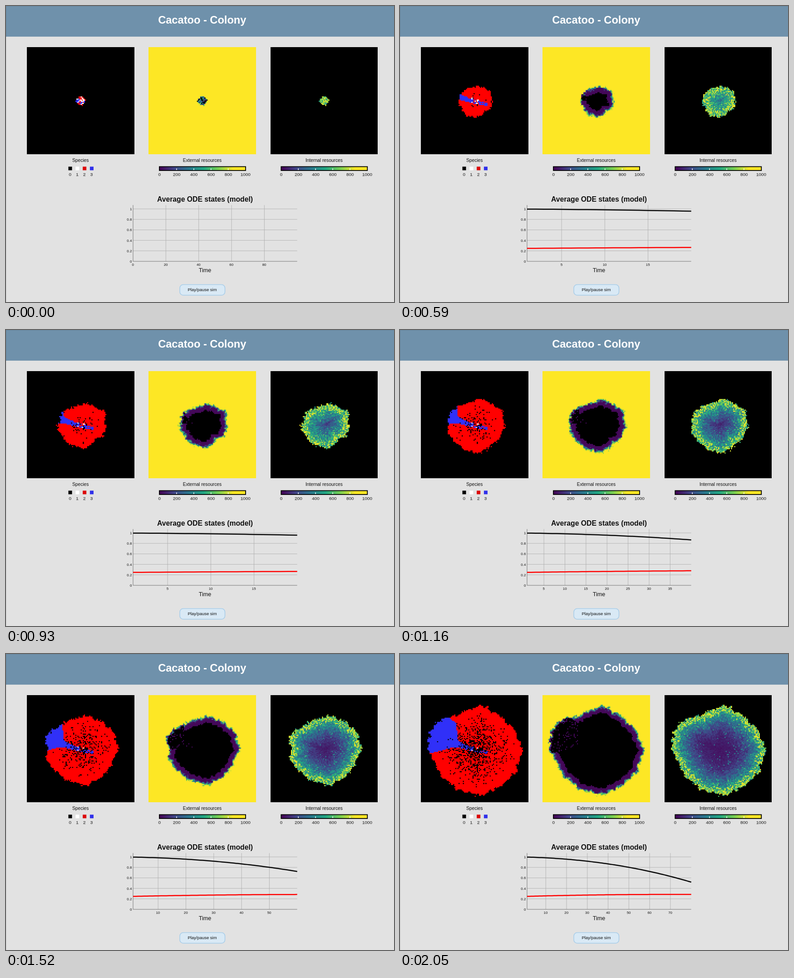
These frames come from a looping animation (855x655 px, 2.15 s). An HTML page with a canvas:

```html
<!DOCTYPE html>
<html lang="en">
<head>
<meta charset="utf-8">
<title>Cacatoo - Colony</title>
<style>
  html, body { margin: 0; width: 100%; height: 100%; overflow: hidden; background: #e2e2e2; }
  svg, canvas { position: absolute; display: block; }
  svg { left: 0; top: 0; font-family: "Liberation Sans", Arial, sans-serif; }
  canvas { top: 91.4px; width: 236.5px; height: 236.5px; }
</style>
</head>
<body>
<svg id="page" width="855" height="655" viewBox="0 0 855 655">
  <defs>
    <linearGradient id="viridis"></linearGradient>
  </defs>
  <rect width="855" height="655" fill="#e2e2e2"/>
  <path d="M.5 68V655" stroke="#cdcdcd"/>
  <rect width="855" height="67.8" fill="#6f91ab"/>
  <path d="M.5 68V.5H855" fill="none" stroke="#66859d"/>
  <g id="labels"></g>
  <g id="chart"></g>
  <rect x="383" y="616.5" width="99.5" height="23.5" rx="7.5" fill="#d9e9f5" stroke="#a9cee9" stroke-width="1.6"/>
  <text x="432.5" y="631" font-size="9.46" text-anchor="middle" fill="#111">Play/pause sim</text>
</svg>
<script>
const LOOP = 2150, SIZE = 100, CELL = 2.365, TAU = Math.PI * 2;
const PANEL_X = [46, 314.3, 582.7];
const STOPS = [[68, 1, 84], [65, 68, 135], [42, 120, 142], [34, 168, 132], [122, 209, 81], [253, 231, 37]];
const BLACK = [0, 0, 0], WHITE = [255, 255, 255], RED = [255, 0, 0], BLUE = [48, 48, 248];

const clamp = (v, lo = 0, hi = 1) => Math.min(hi, Math.max(lo, v));
const mix = (a, b, f) => a + (b - a) * f;

// Linear interpolation through [position, value] keys.
function track(keys, p) {
  let i = 1;
  while (i < keys.length - 1 && keys[i][0] < p) i++;
  const [p0, v0] = keys[i - 1], [p1, v1] = keys[i];
  return mix(v0, v1, (p - p0) / (p1 - p0));
}

function hash(x, y, seed) {
  const s = Math.sin(x * 127.1 + y * 311.7 + seed * 74.7) * 43758.5453;
  return s - Math.floor(s);
}

function viridis(v) {
  const p = clamp(v) * 5, i = Math.min(4, Math.floor(p));
  return STOPS[i].map((c, n) => Math.round(mix(c, STOPS[i + 1][n], p - i)));
}

// ---- Clock: simulation steps
const stepKeys = [[0, 0], [1, 20], [44, 1080], [45, 1100], [65, 1620], [66, 1650], [81, 2050]];
const stepTimes = Array.from({ length: 82 }, (_, k) => Math.round(track(stepKeys, k) / 10) * 10);

// ---- Colony outline: radii every 15 degrees, clockwise from the right
const outlines = [
  [0, Array(24).fill(10)],
  [930, [55, 55, 54, 44, 48, 52, 51, 48, 49, 48, 47, 50, 51, 46, 50, 45, 44, 41, 43, 49, 49, 50, 60, 54]],
  [1520, [83, 78, 76, 78, 77, 81, 77, 75, 74, 73, 76, 78, 72, 81, 77, 68, 68, 66, 70, 74, 73, 76, 81, 80]],
  [2050, [105, 102, 102, 101, 98, 103, 99, 98, 94, 93, 94, 92, 103, 102, 105, 92, 84, 85, 92, 95, 90, 91, 95, 98]]
];

function outlineAt(t) {
  return outlines[0][1].map((_, i) => track(outlines.map(([time, radii]) => [time, radii[i]]), t));
}

function radiusAt(outline, angle) {
  const p = angle / TAU * 24, i = Math.floor(p) % 24;
  const base = mix(outline[i], outline[(i + 1) % 24], p % 1);
  return base * (1 + .016 * Math.sin(13 * angle + 1) + .016 * Math.sin(29 * angle));
}

// Territory of species 3, in page coordinates
const territory = [[40, 226], [72, 219], [112, 208], [128, 207], [150, 213], [163, 216], [192, 222], [192, 215],
  [170, 209], [150, 202], [135, 197], [127, 190], [124, 155], [105, 137], [40, 130]];

function inside(x, y, poly) {
  let hit = false;
  poly.forEach(([x1, y1], i) => {
    const [x2, y2] = poly[(i + 1) % poly.length];
    if ((y1 > y) !== (y2 > y) && x < x1 + (y - y1) / (y2 - y1) * (x2 - x1)) hit = !hit;
  });
  return hit;
}

const cells = Array.from({ length: SIZE * SIZE }, (_, i) => {
  const col = i % SIZE, row = Math.floor(i / SIZE);
  const x = PANEL_X[0] + (col + .5) * CELL, y = 91.5 + (row + .5) * CELL;
  const dx = x - 164.3, dy = y - 210;
  const h = [1, 2, 3, 4].map(seed => hash(col, row, seed));
  return {
    dist: Math.hypot(dx, dy),
    angle: (Math.atan2(dy, dx) + TAU) % TAU,
    rough: 4.5 * (hash(col >> 1, row >> 1, 5) - .5) + 2.6 * (h[0] - .5),
    blue: inside(x, y, territory) && (x < 150 || h[3] > .2),
    h
  };
});

function species(c, depth, radius, t) {
  if (depth < 0) return BLACK;
  if (c.dist < 10 && c.h[2] < .04 + .36 * Math.exp(-t / 500)) return WHITE;
  let death = .00037 * Math.max(0, t - 400) * Math.pow(clamp(1 - c.dist / (.9 * radius)), 1.25);
  if (c.blue && c.dist > 35) death *= .15;
  if (c.h[1] < death) return BLACK;
  return c.blue ? BLUE : RED;
}

function external(c, depth, radius) {
  if (radius < 13 && depth > 0) return c.h[1] < .3 ? BLACK : viridis(c.h[2] * .75);
  if (c.blue && c.dist > 18) {
    if (depth > 2.5) return c.h[2] < .1 && depth < 62 ? viridis(.02) : BLACK;
    return viridis(.3 - depth * .3);
  }
  if (depth > 14.5 + c.rough * .6) return BLACK;
  const rise = clamp((6 - depth) / 7.5);
  return viridis(.02 + rise * rise * (3 - 2 * rise));
}

function internal(c, depth, radius) {
  if (depth < 0) return BLACK;
  const reach = 33 + .8 * Math.max(0, 60 - radius);
  const mean = .055 + .66 * Math.exp(-Math.pow(depth / reach, 1.4));
  if (depth < 14 && c.h[3] < .25) return viridis(.88 + .12 * c.h[2]);
  if (c.h[3] > .965) return viridis(mean + .3);
  return viridis(mean * (.65 + .7 * c.h[2]));
}

// ---- Grid panels
const small = document.createElement("canvas");
small.width = small.height = SIZE;
const smallCtx = small.getContext("2d");
const image = smallCtx.createImageData(SIZE, SIZE);

const panels = [species, external, internal].map((paint, i) => {
  const canvas = document.createElement("canvas");
  canvas.width = canvas.height = SIZE * 3;
  canvas.style.left = PANEL_X[i] + "px";
  document.body.append(canvas);
  const ctx = canvas.getContext("2d");
  ctx.imageSmoothingEnabled = false;
  return { paint, ctx };
});

function drawPanels(t) {
  const outline = outlineAt(t);
  const state = cells.map(c => {
    const radius = radiusAt(outline, c.angle);
    return [radius + c.rough - c.dist, radius];
  });
  for (const { paint, ctx } of panels) {
    cells.forEach((c, i) => image.data.set([...paint(c, ...state[i], t), 255], i * 4));
    smallCtx.putImageData(image, 0, 0);
    ctx.drawImage(small, 0, 0, SIZE * 3, SIZE * 3);
  }
}

// ---- Text and legends
const LEGEND_TEXT = 'style="fill:#444;stroke:#444;stroke-width:.25"';
const text = (x, y, size, content, extra = "") =>
  `<text x="${x}" y="${y}" font-size="${size}" text-anchor="middle" fill="#111" ${extra}>${content}</text>`;

function colourBar(x) {
  let out = `<rect x="${x}" y="355.5" width="190" height="8.5" fill="url(#viridis)" stroke="#000" stroke-width="1.8"/>`;
  for (let i = 0; i <= 5; i++) {
    const tx = x + i * 37.9;
    if (i > 0 && i < 5) out += `<path d="M${tx} 359.5v3.5" stroke="#fff" stroke-width="1.5"/>`;
    out += text(tx + .3, 375.5, 9.9, i * 200, LEGEND_TEXT);
  }
  return out;
}

function drawLabels() {
  // The legend reaches its brightest colour before the end of the bar.
  document.getElementById("viridis").innerHTML = STOPS.map((c, i) =>
    `<stop offset="${i * .172}" stop-color="rgb(${c})"/>`).join("");
  const swatches = ["#000", "#fff", "#dc0808", "#3030ea"].map((fill, i) =>
    `<rect x="${137.5 + i * 15.8}" y="355.5" width="8" height="8" fill="${fill}"/>` +
    text(141.2 + i * 15.8, 375.5, 9.9, i, LEGEND_TEXT));
  document.getElementById("labels").innerHTML =
    text(432.3, 38.5, 23.64, "Cacatoo - Colony", 'font-weight="bold" style="fill:#fff"') +
    ["Species", "External resources", "Internal resources"].map((name, i) =>
      text(PANEL_X[i] + 118.2, 345, 10.24, name)).join("") +
    swatches.join("") + colourBar(338) + colourBar(606.3) +
    text(438.5, 433, 15.76, "Average ODE states (model)", 'font-weight="bold"') +
    text(438.5, 589.3, 12.6, "Time");
}

// ---- Line chart
const LEFT = 280, RIGHT = 641.7, TOP = 440.5, BASE = 565;
const chartY = v => BASE - v * 116;
const blackState = u => .997 - .0183 * u - .0217 * u * u - .0009 * u ** 3;
const redState = u => .2465 + .0375 * (1 - (1 - Math.min(u / 3.4, 1)) ** 2);

function drawChart(count) {
  const first = count ? 1 : 0, last = count || 100;
  const gap = count === 0 ? 20 : count > 40 ? 10 : 5;
  const chartX = n => LEFT + (n - first) / (last - first) * (RIGHT - LEFT);
  let grid = "", out = "";
  for (let i = 0; i <= 5; i++) {
    const y = chartY(i / 5);
    if (i) grid += `M${LEFT} ${y}H${RIGHT}`;
    out += text(277.3, y + 3, 7.88, i / 5, 'style="text-anchor:end"');
  }
  for (let n = Math.ceil(first / gap) * gap; n < last; n += gap) {
    if (n > first) grid += `M${chartX(n)} ${TOP}V${BASE}`;
    out += text(chartX(n) - .3, 575, 7.88, n);
  }
  out = `<path d="${grid}" stroke="#aaa" stroke-width=".8"/>` +
    `<path d="M${LEFT} ${TOP}V${BASE}H${RIGHT}" fill="none" stroke="#777" stroke-width="1"/>` + out;
  const line = (state, colour) => {
    const points = Array.from({ length: count }, (_, i) =>
      `${chartX(i + 1).toFixed(2)},${chartY(state((i + 1) / 20)).toFixed(2)}`);
    return `<polyline points="${points.join(" ")}" fill="none" stroke="${colour}" stroke-width="2.5"/>`;
  };
  if (count) out += line(blackState, "#0a0a0a") + line(redState, "#f00");
  document.getElementById("chart").innerHTML = out;
}

// ---- Playback
let shownStep = -1, shownCount = -1;

function render(t) {
  let step = stepTimes.length - 1;
  while (stepTimes[step] > t) step--;
  if (step === shownStep) return;
  shownStep = step;
  drawPanels(stepTimes[step]);
  const count = Math.floor(step / 20) * 20;
  if (count !== shownCount) drawChart(shownCount = count);
}

drawLabels();
render(0);
const start = performance.now();
function tick() {
  render((performance.now() - start) % LOOP);
  requestAnimationFrame(tick);
}
requestAnimationFrame(tick);
</script>
</body>
</html>
```
